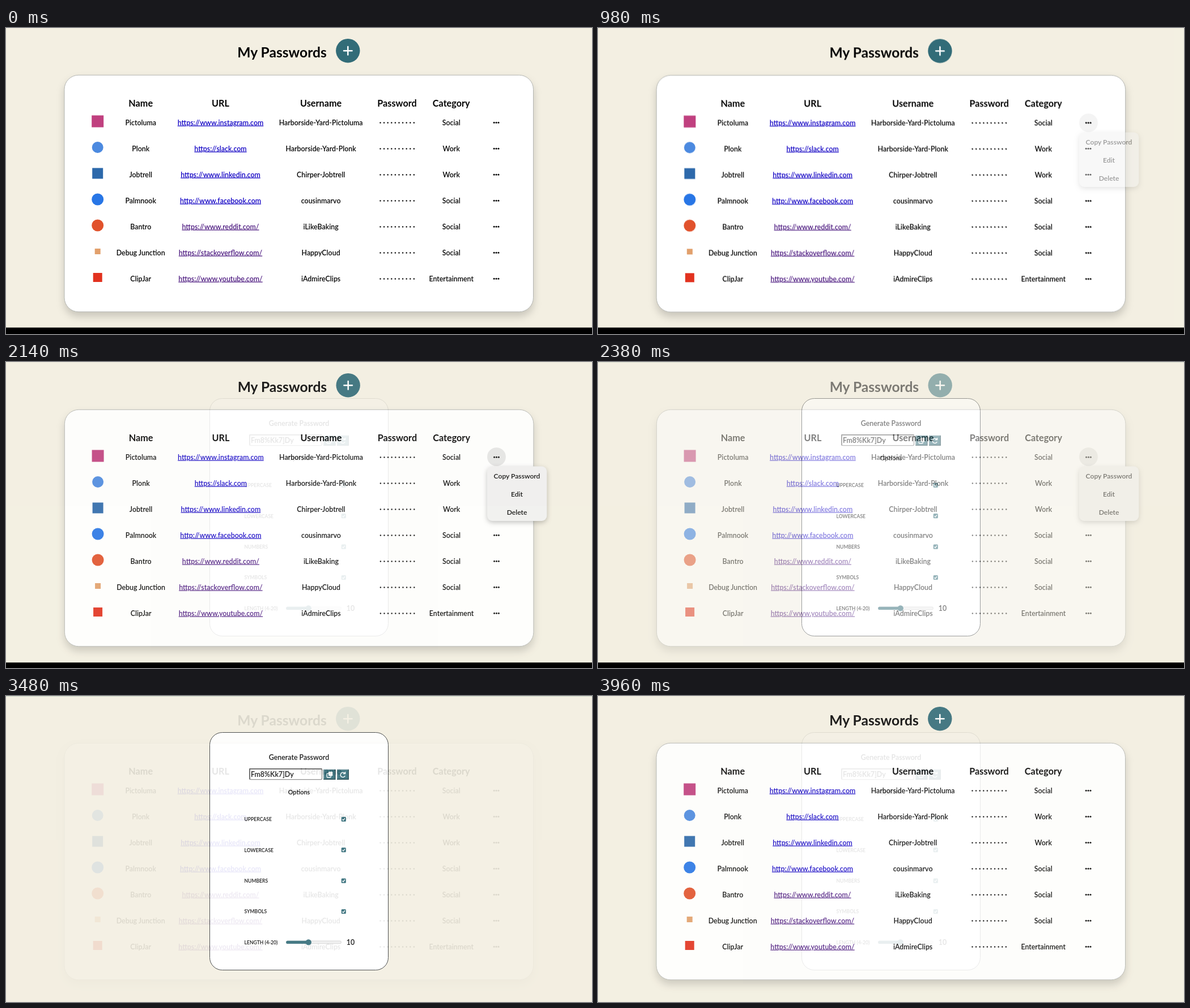
Write an HTML page that moves like this. It is 1034 px wide and 541 px high and loops after 4.02 s.

```html
<!DOCTYPE html>
<html lang="en">
<head>
<meta charset="utf-8">
<title>Password manager</title>
<style>
  html, body { margin: 0; width: 100%; height: 100%; overflow: hidden; background: #f3efe2; }
  svg { display: block; width: 1034px; height: 541px; }
  text { font: 600 12.4px Lato, sans-serif; fill: #050505; }
  .mid { text-anchor: middle; }
  .title { font-size: 24.6px; font-weight: 700; }
  .head { font-size: 16.2px; font-weight: 700; }
  .link { fill: #1000c4; text-decoration: underline; }
  .visited { fill: #4d1a80; }
  .menu-item { font-size: 12.1px; }
  .options { font-size: 10.9px; }
  .label { font-size: 8.6px; }
  .card { filter: drop-shadow(0 8px 7px rgba(0, 0, 0, .17)); }
  .menu { filter: drop-shadow(0 3px 4px rgba(0, 0, 0, .25)); }
</style>
</head>
<body>
<svg id="stage" viewBox="0 0 1034 541"></svg>
<script>
const TEAL = '#326c78', PAPER = '#f3efe2';
const HOLD = 800, STEP = 60, PHASE = 1340, LOOP = 3 * PHASE;

const sites = [
  { name: 'Pictoluma', url: 'https://www.instagram.com', user: 'Harborside-Yard-Pictoluma', group: 'Social', shape: 'square', size: 21, color: '#c0407f' },
  { name: 'Plonk', url: 'https://slack.com', user: 'Harborside-Yard-Plonk', group: 'Work', shape: 'circle', size: 20, color: '#4c8ae0' },
  { name: 'Jobtrell', url: 'https://www.linkedin.com', user: 'Chirper-Jobtrell', group: 'Work', shape: 'square', size: 19, color: '#2d69ab' },
  { name: 'Palmnook', url: 'http://www.facebook.com', user: 'cousinmarvo', group: 'Social', shape: 'circle', size: 21, color: '#2876e6' },
  { name: 'Bantro', url: 'https://www.reddit.com/', visited: true, user: 'iLikeBaking', group: 'Social', shape: 'circle', size: 21, color: '#e1522c' },
  { name: 'Debug Junction', url: 'https://stackoverflow.com/', visited: true, user: 'HappyCloud', group: 'Social', shape: 'square', size: 10, color: '#e2a06c' },
  { name: 'ClipJar', url: 'https://www.youtube.com/', visited: true, user: 'iAdmireClips', group: 'Entertainment', shape: 'square', size: 16, color: '#e2321f' },
];

const rect = (x, y, w, h, r, fill, extra = '') =>
  `<rect x="${x}" y="${y}" width="${w}" height="${h}" rx="${r}" fill="${fill}" ${extra}/>`;
const circle = (x, y, r, fill) => `<circle cx="${x}" cy="${y}" r="${r}" fill="${fill}"/>`;
const line = (d, color, width, extra = '') =>
  `<path d="${d}" fill="none" stroke="${color}" stroke-width="${width}" ${extra}/>`;
const text = (x, y, str, cls = 'mid') => `<text x="${x}" y="${y}" class="${cls}">${str}</text>`;
const dots = (n, x, y, gap, r) =>
  Array.from({ length: n }, (_, i) => circle(x + i * gap, y, r, '#0a0a0a')).join('');
const background = rect(0, 0, 1034, 541, 0, PAPER);

function icon({ shape, size, color }, y) {
  const r = size / 2;
  return shape === 'circle' ? circle(161.7, y, r, color) : rect(161.7 - r, y - r, size, size, 0, color);
}

function siteRow(site, i) {
  const y = 167.5 + 46 * i, base = y + 4;
  return icon(site, y - 2.5)
    + text(237.7, base, site.name)
    + text(378.5, base, site.url, `mid link ${site.visited ? 'visited' : ''}`)
    + text(555.6, base, site.user)
    + dots(10, 660.5, y, 6.6, 1.2)
    + text(785.7, base, site.group)
    + dots(3, 861.2, y - .3, 3.9, 1.5);
}

function passwordList() {
  const heads = [['Name', 237.7], ['URL', 378.5], ['Username', 555.6], ['Password', 690], ['Category', 785.7]];
  return text(487, 51.6, 'My Passwords', 'mid title')
    + circle(603.3, 40.2, 21.2, TEAL)
    + line('M596 40.2h14.6M603.3 32.9v14.6', '#fff', 2.5, 'stroke-linecap="round"')
    + rect(103, 83.3, 827.5, 418.5, 25, '#fff', 'class="card" stroke="#b4b6b2" stroke-width="1"')
    + heads.map(([str, x]) => text(x, 138.5, str, 'mid head')).join('')
    + sites.map(siteRow).join('');
}

function openMenu() {
  return circle(865.5, 167.7, 16.4, '#e5e5e5')
    + dots(3, 861.6, 168.2, 3.9, 1.5)
    + rect(849, 184.5, 105.3, 96.5, 9, '#f0f0f0', 'class="menu"')
    + ['Copy Password', 'Edit', 'Delete']
      .map((str, i) => text(901.5, 205.5 + 32.3 * i, str, 'mid menu-item')).join('');
}

function button(x) {
  return rect(x, 129.8, 21, 18.2, 0, TEAL)
    + line(`M${x + .8} 148V130.6h20.2`, '#5d8790', 1.4)
    + line(`M${x} 147.3h20.3V130`, '#1d434b', 1.4);
}

function checkOption(label, i) {
  const y = 217.8 + 54.4 * i;
  return text(420.5, y + 3.4, label, 'label')
    + rect(591.7, y - 4.1, 8.2, 8.2, 1.5, TEAL)
    + line(`M593.5 ${y + .2}l1.6 1.7 3-3.8`, '#fff', 1.3);
}

function generator() {
  return rect(0, 0, 1034, 1, 0, '#c5d5c4')
    + rect(359.5, 64.5, 315, 420, 22, '#fff', 'stroke="#3c3f40" stroke-width="1"')
    + text(517, 112.5, 'Generate Password', 'mid')
    + rect(430, 128.8, 127.5, 18.8, 2, '#fff', 'stroke="#858585" stroke-width="1.4"')
    + line('M430 147.5v-18.7h127.5', '#4a4a4a', 1.4)
    + text(432, 143.3, 'Fm8%Kk7]Dy', '')
    + button(560.4) + button(584)
    + rect(566.2, 137, 7, 7, 1.2, 'none', 'stroke="#fff" stroke-width="1.3"')
    + rect(569, 133.8, 7.4, 7.4, 1.2, '#fff')
    + line('M597.6 136.6A4.2 4.2 0 1 0 598.3 141M598.5 134v3.6h-3.6', '#fff', 1.5)
    + text(517, 174, 'Options', 'mid options')
    + ['UPPERCASE', 'LOWERCASE', 'NUMBERS', 'SYMBOLS'].map(checkOption).join('')
    + text(420.5, 438.8, 'LENGTH (4-20)', 'label')
    + rect(494.5, 433, 97, 4.8, 2.4, '#efefef', 'stroke="#c4c4c4" stroke-width=".7"')
    + rect(494.2, 432.7, 40, 5.4, 2.7, TEAL)
    + circle(533.7, 435.4, 5.2, TEAL)
    + text(608, 439.7, '10');
}

const scenes = [
  passwordList(),
  `<g transform="translate(.4 1)">${passwordList()}</g>${openMenu()}`,
  generator(),
];

const stage = document.getElementById('stage');
stage.innerHTML = scenes.map(scene => `<g>${background}${scene}</g>`).join('')
  + rect(0, 530, 1034, 12, 0, '#000');
const layers = [...stage.children].slice(0, 3);
const bar = stage.lastElementChild;

function draw(now) {
  const t = now % LOOP;
  const current = Math.floor(t / PHASE), next = (current + 1) % 3;
  const local = t % PHASE;
  const mix = local < HOLD ? 0 : (Math.floor((local - HOLD) / STEP) + 1) / 10;

  // The final fade reveals the first layer by fading the last one above it.
  const wraps = next === 0;
  layers.forEach((layer, i) => {
    const alpha = i === current ? (wraps ? 1 - mix : 1) : i === next ? (wraps ? 1 : mix) : 0;
    layer.setAttribute('opacity', alpha);
  });
  bar.setAttribute('y', current === 0 ? 529.6 : 531.3);
  bar.setAttribute('opacity', current === 2 ? 0 : 1);
  requestAnimationFrame(draw);
}
draw(performance.now());
</script>
</body>
</html>
```
